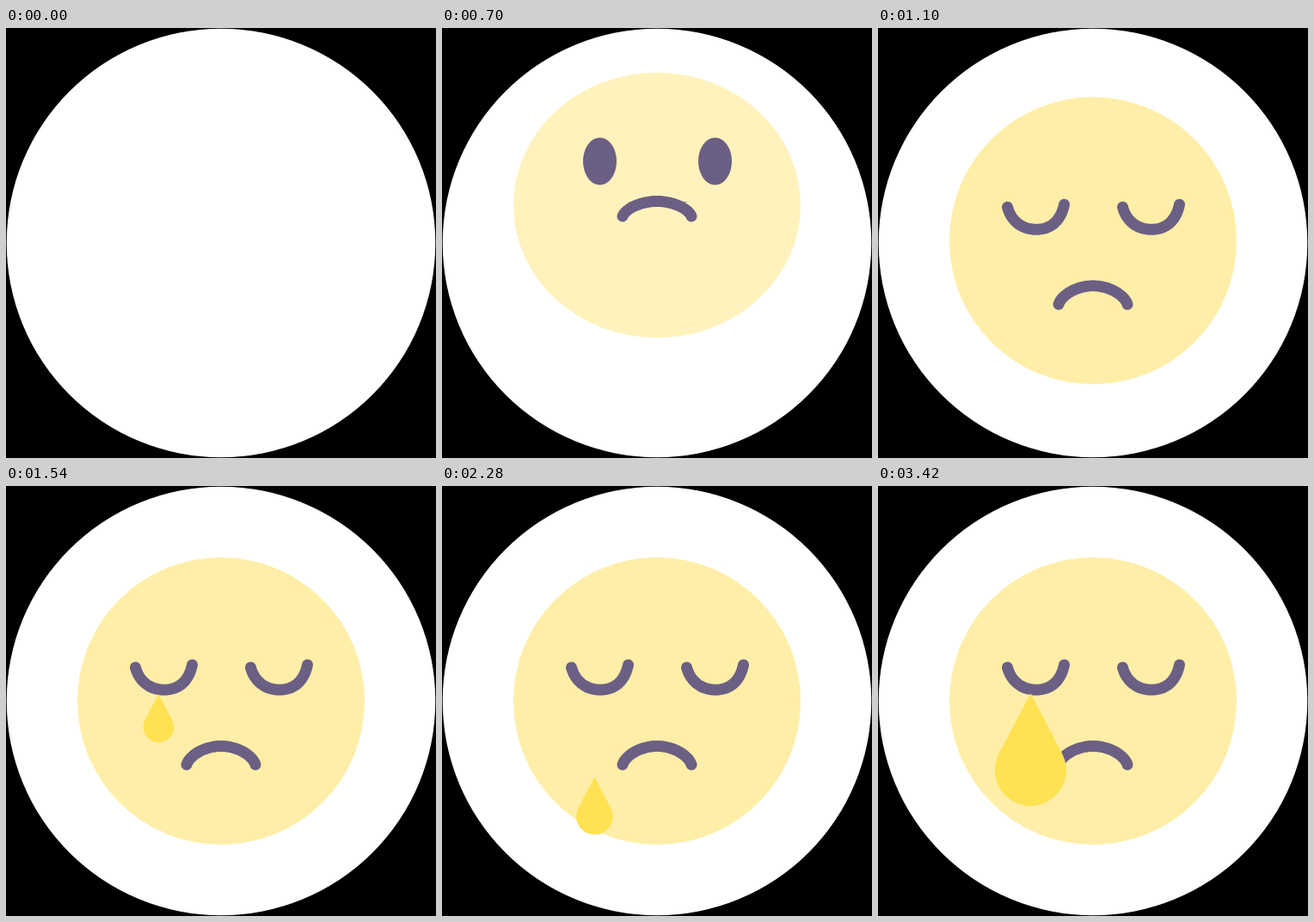
Recreate the animation shown at these times as an HTML page with a canvas. Size 500 by 500 pixels, loop 3440 ms.

```html
<!DOCTYPE html>
<html lang="en">
<head>
<meta charset="utf-8">
<title>Sad face</title>
<style>
html, body { margin: 0; width: 100%; height: 100%; overflow: hidden; background: #000; }
canvas { display: block; width: 500px; height: 500px; }
</style>
</head>
<body>
<canvas id="stage" width="500" height="500"></canvas>
<script>
const ctx = document.getElementById('stage').getContext('2d');
const LOOP = 3440, STEP = 20, HALF = 6.5;
const SKIN = '#ffeea7', INK = '#6b5f84', TEAR = '#ffe252';

const mix = (a, b, k) => a + (b - a) * k;
const ramp = (t, a, b) => Math.min(1, Math.max(0, (t - a) / (b - a)));
const quart = p => p < 0.5 ? 8 * p ** 4 : 1 - 8 * (1 - p) ** 4;
const sine = p => (1 - Math.cos(Math.PI * p)) / 2;
const ease = (t, a, b) => quart(ramp(t, a, b));

// Two joined cubic curves each, relative to the feature's centre
const EYE = {
  curves: [[-33, -12, -28.5, 5, -15, 14, 0.5, 14], [0.5, 14, 19, 14, 29.5, 2, 33, -15]],
  side: 1, rx: 19.5, ry: 27.5
};
const MOUTH = {
  curves: [[-40, 11, -37, 1, -20, -10.5, 0, -10.5], [0, -10.5, 20, -10.5, 37, 1, 40, 11]],
  side: -1, rx: 27.2, ry: 19.2
};

function bezier(c, k, o) {
  const j = 1 - k;
  return j ** 3 * c[o] + 3 * j * j * k * c[o + 2] + 3 * j * k * k * c[o + 4] + k ** 3 * c[o + 6];
}

function slope(c, k, o) {
  const j = 1 - k;
  return j * j * (c[o + 2] - c[o]) + 2 * j * k * (c[o + 4] - c[o + 2]) + k * k * (c[o + 6] - c[o + 4]);
}

// Outline of a round-capped stroke: outer edge, cap, inner edge, cap
function outline(shape, sag) {
  const pts = [], n = 40, caps = 14;
  const put = (s, turn) => {
    const i = s < 0.5 ? 0 : 1, k = s * 2 - i;
    const c = shape.curves[i].map((v, j) => j % 2 ? v * sag : v);
    const a = Math.atan2(slope(c, k, 1), slope(c, k, 0)) + shape.side * (Math.PI / 2 - turn);
    pts.push([bezier(c, k, 0) + HALF * Math.cos(a), bezier(c, k, 1) + HALF * Math.sin(a)]);
  };
  for (let i = 0; i <= n; i++) put(i / n, 0);
  for (let i = 1; i < caps; i++) put(1, Math.PI * i / caps);
  for (let i = n; i >= 0; i--) put(i / n, Math.PI);
  for (let i = 1; i < caps; i++) put(0, Math.PI * (1 + i / caps));
  return pts;
}

// Blends an ellipse (m = 0) into the curved stroke (m = 1)
function feature(shape, x, y, m, sag = 1) {
  ctx.beginPath();
  if (m <= 0) {
    ctx.ellipse(x, y, shape.rx, shape.ry, 0, 0, 7);
  } else {
    const pts = outline(shape, sag), n = pts.length;
    pts.forEach(([px, py], i) => {
      const a = Math.PI - shape.side * 2 * Math.PI * (i + 7) / n;
      ctx.lineTo(
        x + mix(shape.rx * Math.cos(a - shape.side * 0), px, m),
        y + mix(shape.ry * Math.sin(a), py, m)
      );
    });
    ctx.closePath();
  }
  ctx.fill();
}

function ellipse(x, y, rx, ry) {
  ctx.beginPath();
  ctx.ellipse(x, y, rx, ry, 0, 0, 2 * Math.PI);
  ctx.fill();
}

function face(t) {
  const fall = ease(t, 720, 1260), settle = ease(t, 720, 1090);
  const cy = mix(mix(326, 206, ease(t, 280, 545)), 250, fall);
  const ry = 167 - 12.7 * ease(t, 280, 600) * (1 - settle);
  ctx.fillStyle = SKIN;
  ctx.globalAlpha = ramp(t, 280, 840);
  ellipse(250, cy, 167, ry);

  const lift = ease(t, 280, 634);
  const place = (start, top, rest) =>
    t < 720 ? mix(start, top, lift) : cy + mix(top - 206, rest - 250, settle);
  const eyeY = place(298, 155, 223), mouthY = place(344, 210, 313);

  ctx.fillStyle = INK;
  ctx.globalAlpha = ramp(t, 280, 470);
  const lid = sine(ramp(t, 800, 1060));
  feature(EYE, 183.5, eyeY, lid);
  feature(EYE, 317.5, eyeY, lid);

  ctx.globalAlpha = ramp(t, 300, 500);
  feature(MOUTH, 250, mouthY, sine(ramp(t, 480, 660)), mix(0.81, 1, sine(ramp(t, 700, 860))));
  if (t >= 600 && t < 760) {
    ctx.beginPath();
    ctx.moveTo(215, mouthY - 7.5);
    ctx.quadraticCurveTo(250, mouthY - 12, 287, mouthY - 7.5);
    ctx.quadraticCurveTo(250, mouthY - 5, 215, mouthY - 7.5);
    ctx.fill();
  }
  ctx.globalAlpha = 1;
}

function drop(bottom, s) {
  if (s <= 0) return;
  const r = 41.5 * s, x = 177.4, y = bottom - r, tip = bottom - 131 * s;
  const a = Math.acos(r / (y - tip));
  ctx.fillStyle = TEAR;
  ctx.beginPath();
  ctx.moveTo(x, tip);
  ctx.arc(x, y, r, -Math.PI / 2 + a, Math.PI * 1.5 - a);
  ctx.closePath();
  ctx.fill();
}

function tears(t) {
  if (t < 1780) {
    const s = ramp(t, 1360, 1780);
    drop(242 + 131 * s, s);
  } else if (t < 2760) {
    const slide = 1 - (1 - ramp(t, 1780, 2200)) ** 4;
    drop(373 + 33 * slide - 2 * ramp(t, 2200, 2440), 1 - sine(ramp(t, 1775, 2800)));
  } else {
    const s = ramp(t, 3000, 3420);
    drop(238 + 3 * s + 131 * s, s);
  }
}

function draw(t) {
  ctx.fillStyle = '#000';
  ctx.fillRect(0, 0, 500, 500);
  ctx.fillStyle = '#fff';
  ellipse(250, 250, 249.3, 249.3);
  if (t > 280) face(t);
  tears(t);
}

const began = performance.now();
function tick() {
  const t = (performance.now() - began) % LOOP;
  draw(Math.floor(t / STEP) * STEP);
  requestAnimationFrame(tick);
}
tick();
</script>
</body>
</html>
```
